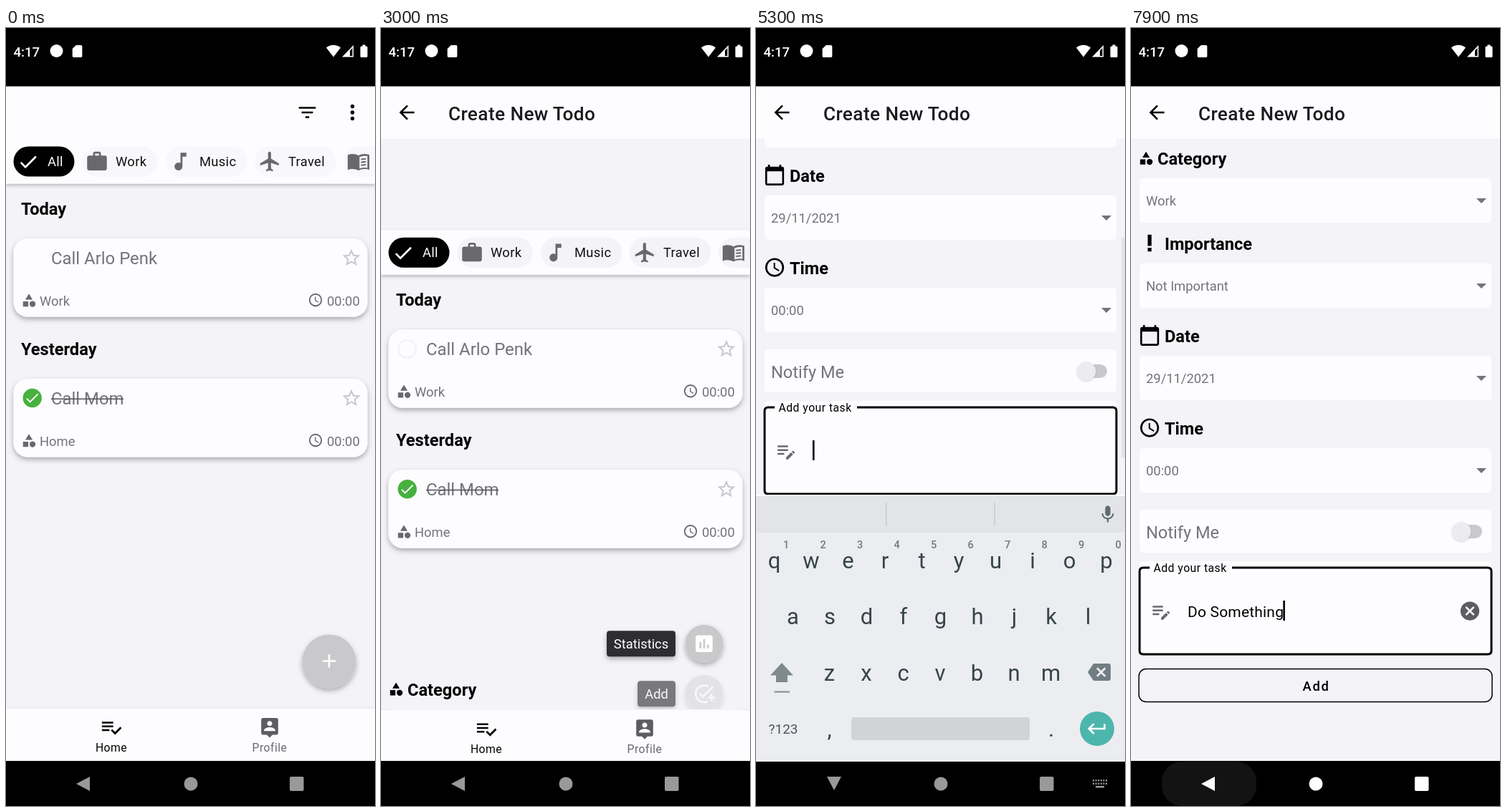
These frames come from a looping animation (515 by 1087 pixels, 8 s). An HTML page:

```html
<!DOCTYPE html>
<html lang="en">
<head>
<meta charset="utf-8">
<title>Todo app</title>
<style>
html, body { margin: 0; width: 100%; height: 100%; overflow: hidden; background: #000; }
svg { display: block; width: 100vw; height: 100vh; }
text { font-family: Roboto, sans-serif; white-space: pre; }
</style>
</head>
<body>
<script>
const LOOP = 8000, STEP = 100, PAGE = 869, SCROLL = 224, KEYS = 371;
const WHITE = '#fdfcff', PAPER = '#f4f3f7', GREY = '#69686c', PALE = '#c9c8cb';

const ICONS = {
  check: 'M9 16.17L4.83 12l-1.42 1.41L9 19 21 7l-1.41-1.41z',
  work: 'M20 6h-4V4c0-1.1-.9-2-2-2h-4c-1.1 0-2 .9-2 2v2H4c-1.1 0-2 .9-2 2v11c0 1.1.9 2 2 2h16c1.1 0 2-.9 2-2V8c0-1.1-.9-2-2-2zm-6 0h-4V4h4v2z',
  music: 'M12 3v10.55c-.59-.34-1.27-.55-2-.55-2.21 0-4 1.79-4 4s1.79 4 4 4 4-1.79 4-4V7h4V3h-6z',
  flight: 'M21 16v-2l-8-5V3.5c0-.83-.67-1.5-1.5-1.5S10 2.67 10 3.5V9l-8 5v2l8-2.5V19l-2 1.5V22l3.5-1 3.5 1v-1.5L13 19v-5.5l8 2.5z',
  book: 'M12 6C9 4 4 4 1 5.5V20.5c3.5-1.5 8-1 11 .5 3-1.5 7.5-2 11-.5V5.5C20 4 15 4 12 6zm9 12.5c-2.5-.7-5.5-.4-8 .7V7.5c2.5-1.2 5.5-1.5 8-.9zM14.5 10.5v-1.5l5-.5v1.5zm0 3v-1.5l5-.5v1.5zm0 3v-1.5l5-.5v1.5z',
  filter: 'M10 18h4v-2h-4v2zM3 6v2h18V6H3zm3 7h12v-2H6v2z',
  star: 'M22 9.24l-7.19-.62L12 2 9.19 8.63 2 9.24l5.46 4.73L5.82 21 12 17.27 18.18 21l-1.63-7.03zM12 15.4l-3.76 2.27 1-4.28-3.32-2.88 4.38-.38L12 6.1l1.71 4.04 4.38.38-3.32 2.88 1 4.28z',
  category: 'M12 2l-5.5 9h11zM3 13.5h8v8H3zM22 17.5a4.5 4.5 0 1 0-9 0 4.5 4.5 0 1 0 9 0z',
  list: 'M14 10H2v2h12v-2zm0-4H2v2h12V6zM2 16h8v-2H2v2zm19.5-4.5L23 13l-6.99 7-4.51-4.5L13 14l3.01 3z',
  person: 'M19 2H5c-1.1 0-2 .9-2 2v14c0 1.1.9 2 2 2h4l3 3 3-3h4c1.1 0 2-.9 2-2V4c0-1.1-.9-2-2-2zm-7 3.3c1.49 0 2.7 1.21 2.7 2.7s-1.21 2.7-2.7 2.7S9.3 9.49 9.3 8s1.21-2.7 2.7-2.7zM18 16H6v-.9c0-2 4-3.1 6-3.1s6 1.1 6 3.1z',
  back: 'M20 11H7.83l5.59-5.59L12 4l-8 8 8 8 1.41-1.41L7.83 13H20z',
  chart: 'M19 3H5c-1.1 0-2 .9-2 2v14c0 1.1.9 2 2 2h14c1.1 0 2-.9 2-2V5c0-1.1-.9-2-2-2zM9 17H7v-7h2zm4 0h-2V7h2zm4 0h-2v-4h2z',
  addTask: 'M22 5.18L10.59 16.6l-4.24-4.24 1.41-1.41 2.83 2.83 10-10zM12 20c-4.41 0-8-3.59-8-8s3.59-8 8-8c1.57 0 3.04.46 4.28 1.25l1.45-1.45C16.1 2.67 14.13 2 12 2 6.48 2 2 6.48 2 12s4.48 10 10 10c1.73 0 3.36-.44 4.78-1.22l-1.5-1.5c-1 .46-2.11.72-3.28.72zm7-5h-3v2h3v3h2v-3h3v-2h-3v-3h-2z',
  alert: 'M10 3h4v12h-4zM10 17h4v4h-4z',
  calendar: 'M20 3h-1V1h-2v2H7V1H5v2H4c-1.1 0-2 .9-2 2v16c0 1.1.9 2 2 2h16c1.1 0 2-.9 2-2V5c0-1.1-.9-2-2-2zm0 18H4V8h16z',
  note: 'M3 10h11v2H3zm0-2h11V6H3zm0 8h7v-2H3zm15-3.13.71-.71c.39-.39 1.02-.39 1.41 0l.71.71c.39.39.39 1.02 0 1.41l-.71.71zm-.71.71-5.3 5.3V21h2.12l5.3-5.3z',
  cancel: 'M12 2a10 10 0 1 0 0 20 10 10 0 1 0 0-20zm5 13.59L15.59 17 12 13.41 8.41 17 7 15.59 10.59 12 7 8.41 8.41 7 12 10.59 15.59 7 17 8.41 13.41 12z',
  erase: 'M22 3H7c-.69 0-1.23.35-1.59.88L0 12l5.41 8.11c.36.53.9.89 1.59.89h15c1.1 0 2-.9 2-2V5c0-1.1-.9-2-2-2zm-3 12.59L17.59 17 14 13.41 10.41 17 9 15.59 12.59 12 9 8.41 10.41 7 14 10.59 17.59 7 19 8.41 15.41 12z',
  mic: 'M12 14c1.66 0 3-1.34 3-3V5c0-1.66-1.34-3-3-3S9 3.34 9 5v6c0 1.66 1.34 3 3 3zm5.3-3c0 3-2.54 5.1-5.3 5.1S6.7 14 6.7 11H5c0 3.41 2.72 6.23 6 6.72V21h2v-3.28c3.28-.48 6-3.3 6-6.72z',
  enter: 'M19 7v4H5.83l3.58-3.59L8 6l-6 6 6 6 1.41-1.41L5.83 13H21V7z',
  card: 'M18 2h-8L4 8v12c0 1.1.9 2 2 2h12c1.1 0 2-.9 2-2V4c0-1.1-.9-2-2-2z',
  clock: 'M12 2a10 10 0 1 0 0 20 10 10 0 1 0 0-20zm0 18a8 8 0 1 1 0-16 8 8 0 1 1 0 16zM12.5 7H11v6l5.25 3.15.75-1.23-4.5-2.67z',
  plus: 'M19 13h-6v6h-2v-6H5v-2h6V5h2v6h6z'
};

const icon = (name, x, y, fill = '#000', size = 31.5) =>
  `<path fill-rule="evenodd" fill="${fill}" transform="translate(${x} ${y}) scale(${size / 24}) translate(-12 -12)" d="${ICONS[name]}"/>`;
const rect = (x, y, w, h, r = 0, fill = WHITE, more = '') =>
  `<rect x="${x}" y="${y}" width="${w}" height="${h}" rx="${r}" fill="${fill}" ${more}/>`;
const circle = (x, y, r, fill, more = '') => `<circle cx="${x}" cy="${y}" r="${r}" fill="${fill}" ${more}/>`;
const path = (d, fill, more = '') => `<path d="${d}" fill="${fill}" ${more}/>`;
const text = (s, x, y, size, fill = '#000', more = '') =>
  `<text x="${x}" y="${y}" font-size="${size}" fill="${fill}" ${more}>${s}</text>`;
const group = (id, inner) => `<g id="${id}">${inner}</g>`;
const MID = 'text-anchor="middle"', BOLD = 'font-weight="700"', SHADOW = 'filter="url(#shadow)"';

function chip(label, glyph, x, w, iconX, textX) {
  return rect(x, 165.5, w, 42, 21, PAPER, 'class="chipBg"') + icon(glyph, iconX, 186.5, GREY, 33) +
    text(label, textX, 192.7, 18.36, '#111', 'letter-spacing=".33"');
}

function todo(y, day, title, place, done) {
  const mark = done
    ? circle(36.7, y + 27, 13.2, '#46b13f') + icon('check', 36.5, y + 27, '#fff', 23)
    : circle(36.5, y + 27, 12.3, 'none', 'id="radio" stroke="#f1f0f4" stroke-width="2"');
  return text(day, 21, y - 33, 23.6, '#000', BOLD) +
    rect(10.5, y, 494, 109.5, 20, WHITE, SHADOW) + mark +
    text(title, 63, y + 35.5, 23.9, '#747377') +
    (done ? rect(63, y + 27.5, 101, 1.6, 0, '#57565a') : '') +
    icon('star', 482, y + 27, PALE, 30) +
    icon('category', 32, y + 86.5, GREY, 22) + text(place, 47, y + 93.5, 18.36, '#747377') +
    icon('clock', 432, y + 86, GREY, 22) + text('00:00', 448, y + 93.5, 18.36, '#747377');
}

function menuItem(id, label, glyph, y, x) {
  return group(id + 'Label', rect(x, y - 18, 411 - x, 36, 4, '#2f2f31', SHADOW) +
      text(label, (x + 411) / 2, y + 6.5, 18.36, '#fff', MID)) +
    group(id + 'Disc', circle(451, y, 26.5, PALE, SHADOW) + icon(glyph, 451, y, '#fff'));
}

function select(y, value) {
  return rect(12, y, 491, 62, 5) + text(value, 21, y + 38, 18.36, '#747377') +
    path(`M482 ${y + 28}h14l-7 7z`, '#747377');
}

const heading = (label, glyph, x, y, size, iconX) =>
  icon(glyph, iconX, y, '#000', size) + text(label, x, y + 9, 23.6, '#000', BOLD);

const home = rect(0, 155, 515, 62.5, 0, WHITE, 'filter="url(#soft)"') +
  rect(10.5, 165.5, 85, 42, 21, '#000') + icon('check', 31, 187, '#fff') +
  text('All', 58, 192.7, 18.36, '#fff', 'letter-spacing=".33"') +
  chip('Work', 'work', 106, 106, 127, 153) + chip('Music', 'music', 223, 113.5, 243.5, 270) +
  chip('Travel', 'flight', 347, 113.5, 368.5, 394) + chip('', 'book', 471, 120, 492, 520) +
  todo(294, 'Today', 'Call Arlo Penk', 'Work', false) + todo(490, 'Yesterday', 'Call Mom', 'Home', true) +
  menuItem('stats', 'Statistics', 'chart', 733, 315) + menuItem('add', 'Add', 'addTask', 803, 358) +
  circle(451, 885, 37.5, PALE, SHADOW) + group('plus', icon('plus', 451, 884.5, '#fff'));

const form = heading('Category', 'category', 37, 182, 22, 21) + select(210, 'Work') +
  heading('Importance', 'alert', 47, 300.5, 31.5, 26) + select(329, 'Not Important') +
  heading('Date', 'calendar', 47, 429.5, 31.5, 26) + select(458, '29/11/2021') +
  heading('Time', 'clock', 47, 558.5, 31.5, 26) + select(587, '00:00') +
  rect(12, 673, 491, 60, 5) + text('Notify Me', 21, 712.5, 23.6, '#747377') +
  rect(459, 694, 31, 19, 9.5, PALE) + circle(461, 703.5, 13.2, '#ecebee', 'filter="url(#faint)"') +
  rect(12, 745, 491, 131, 5) +
  '<path id="frame" fill="none"/>' + icon('note', 42, 815, GREY) +
  text('Add your task', 0, 0, 15.7, '#000', 'id="hint" letter-spacing=".5"') +
  text('', 79, 822.5, 20.98, '#000', 'id="typed" letter-spacing=".2"') +
  rect(79, 824.5, 0, 1.5, 0, '#000', 'id="underline"') + rect(79, 800, 2.6, 28, 0, '#000', 'id="caret"') +
  group('clear', icon('cancel', 473, 814.5, '#5d5c60')) +
  rect(11, 895.5, 493, 46, 10, 'none', 'stroke="#000" stroke-width="1.5"') +
  text('Add', 258.5, 925.5, 18.36, '#000', MID + ' font-weight="500" letter-spacing="1.64"');

const letters = (row, x, y) => [...row].map((c, i) => text(c, x + i * 51.5, y, 31, '#37444a', MID)).join('');
const keyboard = rect(0, 654, 515, 371, 0, '#ecedf1') + rect(0, 654, 515, 51, 0, '#e2e4e7') +
  rect(181, 663, 1.3, 33, 0, '#c4c7ca') + rect(332.5, 663, 1.3, 33, 0, '#c4c7ca') +
  text('', 113.5, 689, 23.2, '#6b7679', `id="left" ${MID}`) + text('', 257, 689, 23.6, '#46545a', `id="middle" ${MID}`) +
  text('', 400.5, 689, 20.5, '#6b7679', `id="right" ${MID}`) +
  group('dots', [250, 257, 264].map(x => circle(x, 701, 2, '#37444a')).join('')) +
  icon('mic', 491, 679.5, '#5f6b70', 29) + letters('qwertyuiop', 25.5, 755) +
  [...'1234567890'].map((c, i) => text(c, 42 + i * 51.5, 727, 14.5, '#6f787c', MID + ' font-weight="500"')).join('') +
  letters('asdfghjkl', 51.5, 833) + letters('zxcvbnm', 102.5, 911.5) +
  path('M36 887L52 904.5H44V914H28V904.5H20Z', '#7f8a8e') + rect(25.5, 926.5, 21.5, 2, 0, '#7f8a8e') +
  icon('erase', 479, 900, '#717d82', 32) + text('?123', 38, 986, 19, '#4b575c', MID) +
  text(',', 102.5, 990, 31, '#37444a', MID) + rect(133, 963, 249, 32, 4, '#d1d3d7') +
  text('.', 412, 990, 31, '#37444a', MID) + circle(476, 979, 24, '#4db6ac') + icon('enter', 476, 979, '#fff');

const keyDots = [0, 1, 2, 3, 4, 5].map(i => rect(470 + i * 3.6, 1050, 2, 2.5, 0, 'inherit') +
  rect(470 + i * 3.6, 1054.5, 2, 2.5, 0, 'inherit')).join('') + rect(474, 1059, 12, 2.5, 0, 'inherit');

const status = rect(0, 0, 515, 81.5, 0, '#000') + text('4:17', 10.5, 39.5, 18.6, '#fff', 'font-weight="500"') +
  circle(70.5, 32, 9, '#fff') + icon('card', 99.5, 32.5, '#fff', 20.5) +
  path('M447 27.5C453 22.5 461 22.5 467 27.5L457 40.5Z', '#fff') +
  path('M485 24V40.5H469Z', '#fff') + path('M480 31.5L483.5 28V39H480Z', '#000') +
  rect(494.5, 25.5, 10, 15.5, 1.5, '#fff') + rect(497.5, 23.5, 4, 3, 0, '#fff');

const shadow = (id, dy, blur, alpha) => `<filter id="${id}" x="-20%" y="-30%" width="140%" height="170%">
  <feDropShadow dx="0" dy="${dy}" stdDeviation="${blur}" flood-opacity="${alpha}"/></filter>`;

document.body.innerHTML = `<svg viewBox="0 0 515 1087" preserveAspectRatio="none">
<defs>${shadow('shadow', 3.5, 3.5, .3)}${shadow('soft', 2.5, 2.5, .25)}${shadow('faint', 1, 1, .2)}
  <clipPath id="view"><rect id="viewport" y="155" width="515"/></clipPath>
</defs>
${rect(0, 0, 515, 1087, 0, WHITE)}
<g clip-path="url(#view)">${rect(0, 155, 515, PAGE, 0, PAPER)}${group('home', home)}${group('form', form)}
${rect(510, 0, 5, 307, 0, '#a9a8ab', 'id="scrollbar"')}</g>
${group('tabs', rect(0, 951, 515, 75, 0, WHITE, 'filter="url(#soft)"') + icon('list', 147, 977, '#000') +
  text('Home', 147, 1011, 15.7, '#000', MID + ' letter-spacing=".5"') + icon('person', 368, 977, '#5d5c60') +
  text('Profile', 368, 1011, 15.7, '#69686c', MID + ' letter-spacing=".5"'))}
${rect(0, 81, 515, 74)}
${group('homeBar', icon('filter', 420.5, 118) + [109.5, 118, 126.5].map(y => circle(483.5, y, 2.7, '#000')).join(''))}
${group('formBar', icon('back', 36, 118) + text('Create New Todo', 94, 128.5, 26.2, '#1b1a1d', 'font-weight="500" letter-spacing=".4"'))}
${status}
${rect(0, 1024, 515, 63, 0, '#000')}
${rect(43, 1025, 132, 62, 28, '#131313', 'id="ripple"')}
${group('keyboard', keyboard)}
${group('buttons', path('M98 1056L117 1046V1066Z', 'inherit', 'id="backKey"') + circle(258, 1056, 9.5, 'inherit') +
  rect(396, 1046, 19.5, 20, 2, 'inherit') + group('keyDots', keyDots))}
${circle(0, 0, 14, '#e6e5e7', 'id="touch" stroke="#bdbcbf" stroke-width="1.5"')}
</svg>`.replaceAll('fill="inherit"', '');

const el = {};
document.querySelectorAll('[id]').forEach(node => el[node.id] = node);
const chips = document.querySelectorAll('.chipBg');
const set = (id, attrs) => { for (const key in attrs) el[id].setAttribute(key, attrs[key]); };
const show = (id, on) => set(id, { opacity: +on });
const move = (id, x, y) => set(id, { transform: `translate(${x} ${y})` });

const ramp = (t, from, to) => Math.min(1, Math.max(0, (t - from) / (to - from)));
const smooth = x => (1 - Math.cos(Math.PI * x)) / 2;
const slow = x => 1 - (1 - x) ** 2;
const within = (t, from, to) => t >= from && t < to;

// Touches: from, to, x, y, starting opacity, fill
const TOUCHES = [
  [1680, 1850, 457, 897, 1, '#e6e5e7'],
  [2780, 2900, 451, 805, 1, '#e6e5e7'],
  [4080, 4340, 99, 806, .6, 'none']
];
const TASK = 'Do Something';

function drawMenuItem(id, y, t, openAt, closeAt) {
  const open = slow(ramp(t, openAt, openAt + 200)), stay = 1 - ramp(t, closeAt, closeAt + 260);
  set(id + 'Disc', {
    transform: `translate(451 ${y}) scale(${open}) translate(-451 ${-y})`,
    opacity: stay ** 2
  });
  set(id + 'Label', { transform: `translate(${(1 - open) * 30} 0)`, opacity: open * stay });
}

function drawField(t) {
  const focus = ramp(t, 4120, 4280), focused = t >= 4120;
  const border = 'M141 754H498Q503 754 503 759V870Q503 875 498 875H17Q12 875 12 870V759Q12 754 17 754H26';
  set('frame', {
    d: focused ? border : border + 'H141',
    stroke: focused ? '#000' : '#9b9a9d',
    'stroke-width': focused ? 3 : 1.3
  });
  set('hint', {
    x: 79 - 47.5 * focus, y: 822.5 - 62.5 * focus,
    'font-size': 20.98 - 5.28 * focus, fill: focused ? '#000' : '#747377'
  });

  const count = t < 5600 ? 0 : Math.min(12, 1 + Math.floor((t - 5600) * 11 / 800));
  const typed = TASK.slice(0, count), wordAt = count > 2 ? 3 : 0;
  el.typed.textContent = typed.slice(0, wordAt);
  const wordX = 79 + (wordAt ? el.typed.getComputedTextLength() : 0);
  el.typed.textContent = typed;
  const endX = 79 + (count ? el.typed.getComputedTextLength() : 0);
  set('underline', { x: wordX, width: t < 7560 ? endX - wordX : 0 });
  set('caret', { x: endX - (count ? .8 : 0) });
  show('caret', t >= 4250 && !within(t, 4700, 5200) && !within(t, 7000, 7500));
  show('clear', count > 0);

  const word = typed.slice(wordAt);
  let hints = ['', '', ''];
  if (t >= 6500) hints = ['Something\'s', 'Something', 'Somethings'];
  else if (count > 4) hints = ['Something', word.slice(0, Math.max(2, word.length - 2)), 'Something\'s'];
  else if (count) hints = ['Do', 'Do', 'Don\'t'];
  ['left', 'middle', 'right'].forEach((id, i) => el[id].textContent = hints[i]);
  show('dots', count > 0);
}

function draw(t) {
  const settle = ramp(t, 0, 400);
  chips.forEach(c => c.setAttribute('opacity', .5 + .5 * settle));
  show('radio', settle);

  const page = smooth(ramp(t, 2900, 3300)), formBar = t >= 2900;
  move('home', 0, page * PAGE);
  show('home', page < 1);
  move('tabs', 0, 75 * smooth(ramp(t, 2965, 3280)));
  show('tabs', t < 3280);
  show('homeBar', !formBar);
  show('formBar', formBar);
  set('plus', { transform: `rotate(${-135 * slow(ramp(t, 1760, 2060))} 451 884.5)` });
  drawMenuItem('add', 803, t, 1800, 2900);
  drawMenuItem('stats', 733, t, 1900, 3010);

  const resized = within(t, 4450, 7570);
  const scroll = resized ? SCROLL * slow(ramp(t, 4450, 4637)) : 0;
  set('viewport', { height: resized ? 497 : PAGE });
  move('form', 0, (1 - page) * PAGE - scroll);
  show('form', formBar);
  set('scrollbar', { y: 155 + scroll * 497 / 805, opacity: resized ? 1 - ramp(t, 4950, 5400) : 0 });
  drawField(t);

  const up = slow(ramp(t, 4450, 4716)), down = ramp(t, 7480, 7720) ** 2;
  const shown = within(t, 4450, 7720), sliding = shown && (up < 1 || down > 0);
  move('keyboard', 0, KEYS * (1 - up + down));
  show('keyboard', shown);
  const leaving = t >= 7480;
  set('buttons', { fill: sliding || leaving ? '#fff' : '#999', opacity: sliding ? .7 : 1 });
  set('backKey', { transform: `rotate(${-90 * up * (1 - ramp(t, 7480, 7700))} 108 1055)` });
  show('keyDots', shown && !leaving);
  show('ripple', leaving);

  const touch = TOUCHES.find(([from, to]) => within(t, from, to));
  show('touch', false);
  if (touch) {
    const [from, to, x, y, alpha, fill] = touch;
    set('touch', { cx: x, cy: y, fill, opacity: alpha * (1 - ramp(t, from + (to - from) / 3, to)) });
  }
}

// The screen refreshes ten times a second.
const start = performance.now();
function tick() {
  const t = (performance.now() - start) % LOOP;
  draw(Math.floor(t / STEP) * STEP);
  requestAnimationFrame(tick);
}
tick();
</script>
</body>
</html>
```
